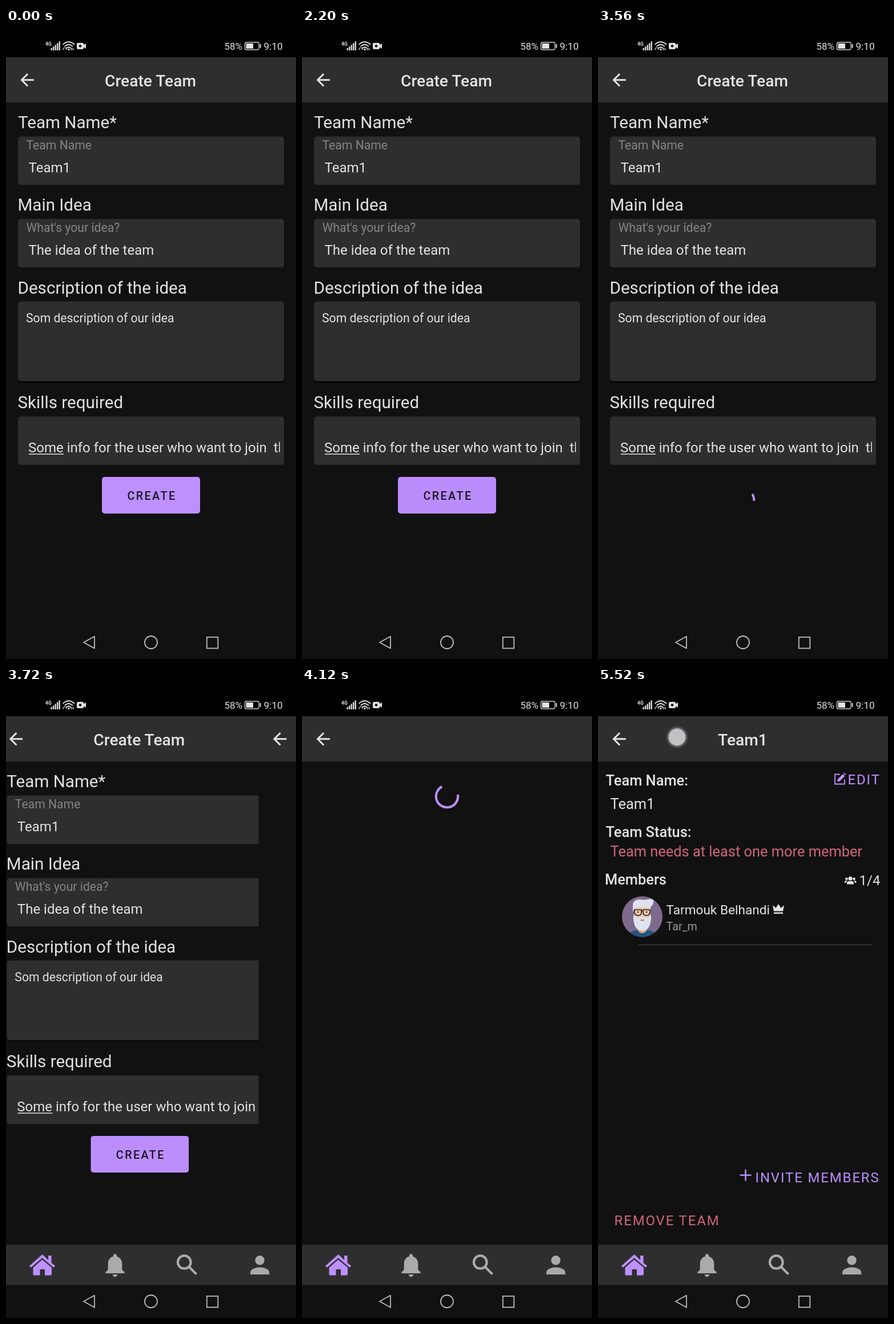
Animation, 508 px wide and 1102 px high, one loop 5.68 s. Source, as an HTML page:

```html
<!DOCTYPE html>
<html lang="en">
<head>
<meta charset="utf-8">
<title>Create team</title>
<style>
html, body { margin: 0; height: 100%; overflow: hidden; background: #111; }
svg { font-family: Roboto, sans-serif; fill: #e3e3e3; }
#stage { display: block; width: 100vw; height: 100vh; }
.panel { fill: #2e2e2e; }
.title { font-size: 28.2px; font-weight: 500; }
.label { font-size: 29.6px; }
.hint { font-size: 21.16px; fill: #858585; }
.input { font-size: 24px; }
.note { font-size: 21.16px; }
.head { font-size: 25.4px; font-weight: 500; }
.value { font-size: 25.4px; }
.action { font-size: 24px; letter-spacing: 1.85px; }
.accent { fill: #bd8fff; }
.red { fill: #cf6679; }
.tab { fill: #aaa; }
.line { fill: none; stroke: #bdbdbd; stroke-width: 1.8; }
.spin { fill: none; stroke: #bd8fff; stroke-width: 4; }
</style>
</head>
<body>
<svg id="stage" viewBox="0 0 508 1102">
  <defs>
    <path id="arrow" transform="translate(19.4 73.2) scale(1.47)" d="M20 11H7.83l5.59-5.59L12 4l-8 8 8 8 1.41-1.41L7.83 13H20z"/>
    <radialGradient id="glow">
      <stop offset=".7" stop-color="#fff" stop-opacity=".35"/>
      <stop offset="1" stop-color="#fff" stop-opacity=".04"/>
    </radialGradient>
    <clipPath id="buttonClip"><rect x="168" y="784" width="172" height="64" rx="5"/></clipPath>
    <clipPath id="faceClip"><circle cx="77.5" cy="401" r="35.5"/></clipPath>
  </defs>
  <rect width="508" height="1102" fill="#111"/>

  <g id="form">
    <rect class="panel" y="51" width="508" height="79"/>
    <use href="#arrow"/>
    <text class="title" x="173" y="102">Create Team</text>

    <text class="label" x="21" y="175">Team Name*</text>
    <rect class="panel" x="21" y="189.5" width="466" height="84.5" rx="5"/>
    <text class="hint" x="35.5" y="212">Team Name</text>
    <text class="input" x="39.5" y="252">Team1</text>

    <text class="label" x="20.5" y="319">Main Idea</text>
    <rect class="panel" x="21" y="333.5" width="466" height="84.5" rx="5"/>
    <text class="hint" x="35.5" y="356">What's your idea?</text>
    <text class="input" x="39.5" y="396">The idea of the team</text>

    <text class="label" x="20.5" y="463.5">Description of the idea</text>
    <rect x="21" y="480" width="466" height="139" rx="5" fill="#000"/>
    <rect class="panel" x="21" y="477.5" width="466" height="139.5" rx="5"/>
    <text class="note" x="35" y="514">Som description of our idea</text>

    <text class="label" x="20.5" y="664">Skills required</text>
    <rect class="panel" x="21" y="678.5" width="466" height="84.5" rx="5"/>
    <svg y="678" width="479.7" height="85">
      <text class="input" x="39" y="63">Some info for the user who want to join&#160; the team</text>
      <rect x="40" y="65.5" width="61" height="1.5"/>
    </svg>

    <g id="button" clip-path="url(#buttonClip)">
      <rect class="accent" x="168" y="784" width="172" height="64"/>
      <text x="212.5" y="824" font-size="19.75" font-weight="500" letter-spacing="2.4" fill="#1d1625">CREATE</text>
      <circle id="ripple" cx="304" cy="819" fill="#000"/>
    </g>
    <circle id="spinForm" class="spin" cx="254" cy="824" r="19.2" pathLength="360"/>
    <rect id="dim" y="51" width="508" height="993" fill="#000"/>
  </g>

  <g id="team">
    <rect y="51" width="508" height="993" fill="#111"/>
    <rect class="panel" y="51" width="508" height="79"/>
    <use href="#arrow"/>
    <circle id="spinTeam" class="spin" cx="254" cy="191" r="19.2" pathLength="360"/>

    <g id="details">
      <text class="title" x="210" y="102">Team1</text>
      <text class="head" x="13.5" y="171.5">Team Name:</text>
      <text class="value" x="21.5" y="213">Team1</text>
      <path d="M424 152.5H415V169.5H432V161" class="line" style="stroke:#bd8fff"/>
      <path class="accent" d="M419.5 161.5 429 152l3.5 3.500L423 165h-3.500zM430 151l1.500-1.500 3 3L433.500 154z"/>
      <text class="action accent" x="437.5" y="169.5">EDIT</text>
      <text class="head" x="13.5" y="262">Team Status:</text>
      <text class="value red" x="21.5" y="296">Team needs at least one more member</text>
      <text class="head" x="12" y="345">Members</text>
      <g>
        <circle cx="442" cy="334.5" r="3.5"/>
        <circle cx="435.5" cy="335" r="2.3"/>
        <circle cx="448.5" cy="335" r="2.3"/>
        <path d="M436 344.5v-2q0-3.500 4-3.500h4q4 0 4 3.500v2zM432 342v-1.500q0-2.500 3-2.500h2q-2.500 1.500-2.500 4zM452.500 342v-1.500q0-2.500-3-2.500h-2q2.500 1.500 2.500 4z"/>
      </g>
      <text class="input" x="457.5" y="346">1/4</text>
      <text x="119.5" y="397" font-size="22.6">Tarmouk Belhandi</text>
      <path d="M308 391.5 306 381l5.500 5 4.500-7 4.500 7 5.500-5-2 10.500zM308 393.500h16v2.500h-16z"/>
      <text x="119.5" y="425" font-size="19.75" fill="#9c9c9c">Tar_m</text>
      <rect x="71" y="450" width="409" height="1" fill="#4c4c4c"/>
      <path d="M258.5 842.5v20M248.5 852.5h20" class="line" style="stroke:#bd8fff;stroke-width:2.5"/>
      <text class="action accent" x="275.5" y="865">INVITE MEMBERS</text>
      <text class="action red" x="28.5" y="939.5">REMOVE TEAM</text>
    </g>

    <g id="avatar" clip-path="url(#faceClip)">
      <rect x="42" y="365" width="71" height="72" fill="#7d6a8d"/>
      <path d="M52 437q2-11 15-12h21q13 1 15 12z" fill="#20557f"/>
      <path d="M70 412h15v14q-7.500 8-15 0z" fill="#dca87f"/>
      <rect x="63" y="378" width="29" height="42" rx="12" fill="#f3c9a5"/>
      <path d="M61 393V379q2-8 12-8 8 1 14 0 8-2 10 2 1 7-5 11v9l-3-8H65z" fill="#dfe2ef"/>
      <path d="M62 398q3 6 9 5 7-3 14 0 6 1 8-5 1 27-15.500 28Q61 425 62 398z" fill="#dfe2ef"/>
      <path d="M73 407q4.500-2 9 0-4.500 3-9 0z" fill="#c87f74"/>
      <path d="M64 389h12v6q-1 4-6 4t-6-5zM79 389h12v5q-1 5-6 5t-6-4zM76 391h3" fill="none" stroke="#222431" stroke-width="1.7"/>
      <circle cx="70" cy="393" r="1.3" fill="#222431"/>
      <circle cx="85" cy="393" r="1.3" fill="#222431"/>
    </g>
  </g>

  <g id="tabs">
    <rect class="panel" y="974" width="508" height="70.5"/>
    <g class="accent">
      <path d="M63.5 991 74 1000.5V993h5.500v12.500L86 1011l-2.500 3-20-17-20 17-2.500-3z"/>
      <path d="M63.5 1000 80 1014v11.500q0 2-2 2H68V1017h-8.500v10.500H49.500q-2 0-2-2V1014z"/>
    </g>
    <g class="tab">
      <path transform="translate(166.3 984.8) scale(2.058)" d="M12 22c1.100 0 2-.9 2-2h-4c0 1.100.9 2 2 2zm6-6v-5c0-3.070-1.640-5.640-4.500-6.320V4c0-.83-.67-1.500-1.500-1.500s-1.500.67-1.500 1.500v.68C7.630 5.360 6 7.920 6 11v5l-2 2v1h16v-1z"/>
      <path transform="translate(419.9 984.8) scale(2.058)" d="M12 12a4 4 0 1 0 0-8 4 4 0 0 0 0 8zm0 2c-2.670 0-8 1.340-8 4v2h16v-2c0-2.660-5.330-4-8-4z"/>
    </g>
    <g fill="none" stroke="#aaa" stroke-width="4.2">
      <circle cx="312.3" cy="1004.4" r="11.3"/>
      <path d="M320.5 1012.5 333.5 1025.5"/>
    </g>
  </g>

  <g class="line">
    <path d="M136 1073 155 1062.5V1083.500z" stroke-linejoin="round"/>
    <circle cx="254" cy="1073" r="11"/>
    <rect x="351.8" y="1063.8" width="19.5" height="19.5"/>
  </g>

  <rect width="508" height="51" fill="#000"/>
  <text x="69" y="30.5" font-size="8.5" font-weight="700">4G</text>
  <path d="M78.5 35h2.300v4h-2.300zM82 32.500h2.300v6.500H82zM85.500 29.500h2.300v9.500h-2.300zM89 26.500h2.300v12.500H89zM92.500 23.500h2.300v15.500h-2.300z"/>
  <g fill="none" stroke="#e3e3e3" stroke-width="1.7">
    <path d="M99.5 29q10-9.500 20.500 0M102.500 32.500q7.500-7 14.500 0M105.500 35.500q4.500-4 8.500 0"/>
    <path d="M100 38.5q0-4 3-4t3 4" stroke-width="1.2"/>
  </g>
  <circle cx="110" cy="37.5" r="1.7"/>
  <path d="M114.5 39v-4M117.5 35v4" stroke="#e3e3e3" stroke-width="1.5"/>
  <path d="M126 26h8q2 0 2 2v1.500l4-2.500v9l-4-2.500V35q0 2-2 2h-8q-2 0-2-2v-7q0-2 2-2z"/>
  <circle cx="130" cy="31.5" r="2.2" fill="#000"/>
  <text x="382.5" y="38" font-size="17">58%</text>
  <rect x="418.5" y="25" width="24.5" height="13" rx="2.5" fill="none" stroke="#cfcfcf" stroke-width="1.3"/>
  <rect x="420.5" y="27" width="12.5" height="9"/>
  <rect x="444.5" y="28" width="2" height="7" rx="1"/>
  <text x="451.5" y="38" font-size="17.2">9:10</text>

  <g id="touch">
    <circle r="19.5" fill="url(#glow)"/>
    <circle r="14.5" fill="#fff" fill-opacity=".55" stroke="#b9b4dc" stroke-opacity=".6" stroke-width="1.5"/>
  </g>
</svg>
<script>
const LOOP = 5680, STEP = 40, W = 508;
const TAP = 1520, PRESS = 1720, SUBMIT = 2440, OPEN = 3680, LOADED = 4200, FACE = 4320, TAP2 = 5520;
const $ = id => document.getElementById(id);
const show = (id, on) => $(id).style.display = on ? '' : 'none';
const clamp = v => Math.min(1, Math.max(0, v));

// Cubic from (0,0) to (.5,1) with handles (.2,0) and (.1,1).
function sweep(x) {
  if (x <= 0) return 0;
  if (x >= .5) return 1;
  let lo = 0, hi = 1;
  for (let i = 0; i < 20; i++) {
    const s = (lo + hi) / 2, r = 1 - s;
    if (.6 * r * r * s + .3 * r * s * s + .5 * s ** 3 < x) lo = s; else hi = s;
  }
  return lo * lo * (3 - 2 * lo);
}

function spin(id, age, on) {
  show(id, on && age > 0);
  const p = Math.max(0, age) / 1333 % 1;
  const tail = sweep(p - .5), len = 270 * (sweep(p) - tail);
  const start = age * 720 / 6665 + 90 * p + 270 * tail - 90;
  const arc = $(id);
  arc.setAttribute('stroke-dasharray', `${len} 360`);
  arc.setAttribute('transform', `rotate(${start} ${arc.getAttribute('cx')} ${arc.getAttribute('cy')})`);
}

function draw(now) {
  const t = Math.floor(now % LOOP / STEP) * STEP;

  const ripple = $('ripple');
  show('ripple', t >= PRESS && t < 2240);
  ripple.setAttribute('r', 15 + 130 * (1 - (1 - clamp((t - PRESS) / 260)) ** 2));
  ripple.setAttribute('opacity', .16 * clamp((2220 - t) / 240));

  show('button', t < SUBMIT || t >= OPEN);
  spin('spinForm', t - 2504, t < OPEN);

  const slide = t < 3712 ? 0 : t > 4110 ? 1 : 1 - Math.exp((3712 - t) / 58);
  $('form').setAttribute('transform', `translate(${-.3 * W * slide})`);
  $('team').setAttribute('transform', `translate(${W * (1 - slide)})`);
  $('dim').setAttribute('opacity', .07 * slide);
  show('form', slide < 1);
  show('team', slide > 0);
  show('tabs', t >= OPEN);

  spin('spinTeam', t - 3660, t < LOADED);
  show('details', t >= LOADED);
  show('avatar', t >= FACE);

  show('touch', t >= TAP && t <= PRESS || t >= TAP2);
  $('touch').setAttribute('transform', t < TAP2 ? 'translate(304 819)' : 'translate(138.5 87.5)');
}

function tick() {
  draw(performance.now());
  requestAnimationFrame(tick);
}
tick();
</script>
</body>
</html>
```
